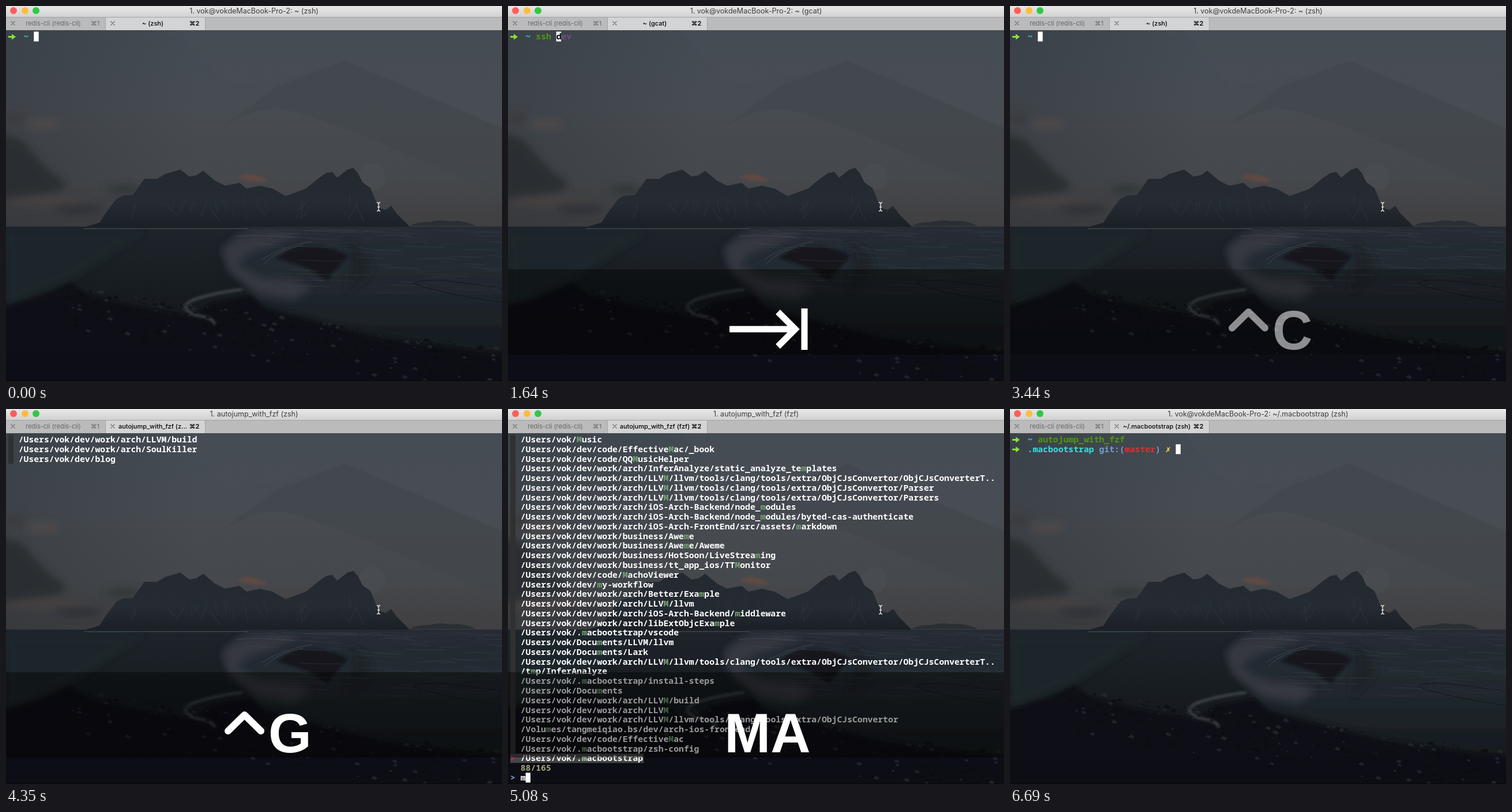
An HTML page that plays this animation: 860 by 651 pixels, repeating every 8 s.

```html
<!DOCTYPE html>
<html lang="en">
<head>
<meta charset="utf-8">
<title>Terminal</title>
<style>
  html, body { margin: 0; width: 100%; height: 100%; overflow: hidden; background: #0d0f11; }
  svg { display: block; width: 860px; height: 651px; }
  .ui { font-family: Inter, "Liberation Sans", "DejaVu Sans", sans-serif; text-anchor: middle; }
  .tab { font-size: 11px; }
  .mono { font: 600 14.76px "Noto Sans Mono", "DejaVu Sans Mono", monospace; fill: #fff; white-space: pre; }
  .key { font: bold 96px "Liberation Sans", sans-serif; fill: #fff; }
</style>
</head>
<body>
<svg viewBox="0 0 860 651" xmlns="http://www.w3.org/2000/svg">
  <defs>
    <linearGradient id="sky" x2="0" y2="1">
      <stop stop-color="#434b53"/><stop offset=".4" stop-color="#474c52"/>
      <stop offset=".75" stop-color="#45484c"/><stop offset="1" stop-color="#403f41"/>
    </linearGradient>
    <linearGradient id="shade"><stop stop-color="#1f252c" stop-opacity=".25"/><stop offset="1" stop-color="#1f252c" stop-opacity="0"/></linearGradient>
    <linearGradient id="rock" x2="0" y2="1"><stop stop-color="#23292f"/><stop offset=".6" stop-color="#252b32"/><stop offset="1" stop-color="#1b2026"/></linearGradient>
    <linearGradient id="sand" x2="0" y2="1">
      <stop stop-color="#1e242a"/><stop offset=".4" stop-color="#171c21"/><stop offset="1" stop-color="#0e1012"/>
    </linearGradient>
    <linearGradient id="sea" x2="0" y2="1">
      <stop stop-color="#262d35"/><stop offset=".5" stop-color="#20272d"/><stop offset="1" stop-color="#14181c"/>
    </linearGradient>
    <linearGradient id="bar" x2="0" y2="1"><stop stop-color="#e8e8e8"/><stop offset="1" stop-color="#d0d0d0"/></linearGradient>
    <filter id="soft" x="-50%" y="-50%" width="200%" height="200%"><feGaussianBlur stdDeviation="7"/></filter>
    <filter id="haze" x="-50%" y="-50%" width="200%" height="200%"><feGaussianBlur stdDeviation="2"/></filter>
    <clipPath id="band"><rect y="457" width="860" height="148"/></clipPath>
    <clipPath id="ground"><rect y="383" width="860" height="268"/></clipPath>
  </defs>

  <g id="photo">
    <rect y="42" width="860" height="342" fill="url(#sky)"/>
    <path d="M380 140Q500 128 588 95L860 212V42H300Z" fill="#4b5059" opacity=".35" filter="url(#haze)"/>
    <path d="M360 220Q410 185 460 178T860 330V212L588 95 470 140Z" fill="#42474c" opacity=".6"/>
    <rect y="42" width="330" height="342" fill="url(#shade)"/>
    <g filter="url(#soft)">
      <path d="M-20 222Q30 225 42 250Q60 270 80 290Q120 312 90 322Q40 330 -20 338Z" fill="#292d32"/>
      <ellipse cx="65" cy="205" rx="30" ry="8" fill="#4f4948"/>
      <ellipse cx="15" cy="195" rx="18" ry="12" fill="#3a3b3e"/>
      <ellipse cx="70" cy="338" rx="70" ry="5" fill="#4b423f"/>
      <ellipse cx="125" cy="353" rx="42" ry="9" fill="#2f3337"/>
      <ellipse cx="203" cy="319" rx="30" ry="9" fill="#33373b"/>
    </g>
    <path d="M401 297Q425 284 455 304Q425 308 401 297Z" fill="#614a42" filter="url(#haze)"/>
    <circle cx="635" cy="297" r="23" fill="#555a60" opacity=".22"/>
    <path d="M700 382Q712 374 735 375Q750 370 770 374Q790 370 815 382Z" fill="#292f35"/>
    <path d="M138 383L162 376 178 352 192 334 204 329 220 328 240 300 262 300 275 292 302 284 318 296 330 294 342 286 362 303 380 312 405 307 417 317 440 312 462 317 485 330 520 317 542 299 555 290 566 288 574 298 592 284 602 281 610 290 618 306 632 316 646 350 658 354 668 347 677 360 700 383Z" fill="url(#rock)"/>
    <g id="ridges" fill="none" stroke="#353b42" opacity=".5"/>
    <g clip-path="url(#ground)">
      <rect y="382" width="860" height="269" fill="url(#sand)"/>
      <path d="M420 380H880V610Q700 585 600 560T440 515Q390 460 375 425Z" fill="url(#sea)" filter="url(#soft)"/>
      <g filter="url(#soft)">
        <path d="M400 402Q450 392 510 396L470 412 420 430 400 450 440 470 500 475 530 490 500 510 440 500 385 460 375 420Z" fill="#34393f"/>
        <path d="M590 410Q640 430 630 465L590 500 600 450Z" fill="#1c2228"/>
        <path d="M0 392L240 392 120 470 0 520Z" fill="#1f252a"/>
      </g>
      <path d="M497 419Q560 412 592 434L575 455 565 465 558 476 545 470 528 457 500 447 470 438Z" fill="#14191d" filter="url(#haze)"/>
      <path d="M135 386.500H420" stroke="#565b5f" opacity=".8"/>
      <g id="waves" fill="none" stroke="#414950" opacity=".45"/>
      <path d="M448 448Q464 426 515 415M444 440Q475 418 530 409M400 400Q440 396 500 402" fill="none" stroke="#484e54" opacity=".8"/>
      <path d="M860 515Q760 500 706 482Q720 468 860 490" fill="none" stroke="#11161a"/>
      <path d="M-20 525Q60 510 110 480L140 500 220 520 325 540 355 515 425 503 450 526 560 555 650 580 880 605V680H-20Z" fill="#0d1012" opacity=".85" filter="url(#haze)"/>
      <path d="M330 537Q295 524 325 510Q360 498 410 492M330 537Q360 541 362 553" fill="none" stroke="#454b50" stroke-width="4" filter="url(#haze)"/>
      <g id="stones"/>
    </g>
    <rect y="650" width="860" height="1" fill="#060708"/>
  </g>

  <g id="chrome">
    <rect width="860" height="20" fill="url(#bar)"/>
    <rect y="20" width="860" height="22" fill="#bbb"/>
    <rect x="173" y="20" width="172" height="22" fill="#d4d4d4"/>
    <path d="M0 19.500H860M172.500 20V42M345.500 20V42" stroke="#a3a3a3"/>
    <circle cx="13" cy="8" r="6" fill="#fc5f5a"/><circle cx="33" cy="8" r="6" fill="#fdbc40"/><circle cx="52" cy="8" r="6" fill="#30c748"/>
    <path d="M8.500 26.500l7 7m0-7l-7 7M181.500 26.500l7 7m0-7l-7 7" stroke="#6c6c6c" stroke-width="1.1"/>
    <g class="ui tab">
      <text x="82" y="34" fill="#666">redis-cli (redis-cli)</text>
      <text x="154.500" y="34" fill="#666">⌘1</text>
      <text id="tab" x="254.500" y="34" font-weight="500"/>
      <text x="326.500" y="34" font-weight="600">⌘2</text>
    </g>
    <text id="title" class="ui" x="430" y="13" font-size="12.500" fill="#3c3c3c"/>
  </g>

  <g id="term" class="mono"/>
  <path d="M643 341Q646 341 646 344V353Q646 356 643 356M649 341Q646 341 646 344M646 353Q646 356 649 356M644 349H648" fill="none" stroke="#e4e4e4" stroke-width="1.3"/>
  <g id="keys" clip-path="url(#band)">
    <rect y="457" width="860" height="148" opacity=".4"/>
    <g id="glyph" class="key"/>
  </g>
</svg>

<script>
const $ = id => document.getElementById(id);
const LOOP = 8000, COL = 8.857, ROW = 16.77, LEFT = 4;
const GREEN = '#4e9a06', LIME = '#8ae234', CYAN = '#34e2e2', RED = '#ef2929', HINT = '#75507b';

// Scenery details
let seed = 7;
const rnd = (a, b) => {
  seed = (seed * 16807) % 2147483647;
  return a + (b - a) * seed / 2147483647;
};
const many = (n, make) => Array.from({ length: n }, make).join('');

$('ridges').innerHTML = many(40, () => {
  const x = rnd(225, 640), y = rnd(322, 350), dx = rnd(-18, 18);
  return `<path d="M${x} ${y}l${dx * .4} 12l${dx * .6} ${rnd(6, 18)}" stroke-width="${rnd(.4, 1.6)}"/>`;
});
$('waves').innerHTML = many(110, () => {
  const d = rnd(0, 1) ** 1.6, x = rnd(400 + d * 90, 850), w = rnd(15, 80);
  return `<path d="M${x} ${388 + d * 110}q${w / 2} ${rnd(-3, 3)} ${w} ${rnd(0, 3)}" stroke-width="${rnd(.4, 1.2)}"/>`;
});
$('stones').innerHTML = many(240, (_, i) => {
  const x = rnd(100, 860), y = 475 + x * .14 + rnd(0, 1) ** 1.5 * 80, w = rnd(3, 12);
  return `<path d="M${x} ${y}l${w * .4} ${-w * .4}l${w * .6} ${w * .3}l${-w * .2} ${w * .4}z" fill="${i % 3 ? '#0b0d10' : '#262c31'}" opacity=".7"/>`;
});

// Terminal drawing
const rowY = r => 58 + r * ROW;
const at = (col, row, s, fill = '#fff') =>
  `<text x="${LEFT + col * COL}" y="${rowY(row)}" fill="${fill}">${s}</text>`;
const block = (col, row) =>
  `<rect x="${LEFT + col * COL}" y="${rowY(row) - 13.5}" width="8.4" height="17" fill="#fff"/>`;
const arrow = row =>
  `<path transform="translate(4 ${row * ROW})" d="M0 52H6V48.500L13 53.500 6 58.500V55H0Z" fill="${LIME}"/>`;
const home = arrow(0) + at(3, 0, '~', CYAN);

function typed(n) {
  const line = 'ssh dev';
  return home + at(5, 0, line.slice(0, n), n < 3 ? RED : GREEN) + block(5 + n, 0)
    + at(5 + n, 0, line[n], '#000') + at(6 + n, 0, line.slice(n + 1), HINT);
}

// In the lists: @ home, % work folder, & clang tools folder, * marks the next character as matched
const expand = s => s.replace('@', '/Users/vok').replace('%', '/dev/work')
  .replace('&', '/tools/clang/tools/extra').replace('^', '/tools/cl*ang/tools/extra')
  .replace('#', '/ObjCJsConvertor').replace('+', '/ObjCJsConverterT..');
const entry = (s, row, color) =>
  at(2, row, expand(s).replace(/\*(.)/g, `<tspan fill="${color}">$1</tspan>`));
const gutter = rows =>
  `<rect x="4" y="44.500" width="9" height="${rows * ROW}" fill="#303030"/>`;

function finder(items, count, query) {
  const last = items.length - 1;
  return gutter(last)
    + `<rect x="4" y="${rowY(last) - 13}" width="${26 * COL + 1}" height="16" fill="#454647"/>`
    + items.map((s, i) => entry(s, i, i === last ? '#a5d0a0' : '#74a274')).join('')
    + at(0, last, '&gt;', '#e0215c') + at(2, 34, count + '/165', '#a3a37c')
    + at(0, 35, '&gt;', '#87afd7') + at(2, 35, query) + block(2 + query.length, 35);
}

const listM = `@/*Music
@/dev/code/Effective*Mac/_book
@/dev/code/QQ*MusicHelper
@%/arch/InferAnalyze/static_analyze_te*mplates
@%/arch/LLV*M/llvm&#+
@%/arch/LLV*M/llvm&#/Parser
@%/arch/LLV*M/llvm&#/Parsers
@%/arch/iOS-Arch-Backend/node_*modules
@%/arch/iOS-Arch-Backend/node_*modules/byted-cas-authenticate
@%/arch/iOS-Arch-FrontEnd/src/assets/*markdown
@%/business/Awe*me
@%/business/Awe*me/Aweme
@%/business/HotSoon/LiveStrea*ming
@%/business/tt_app_ios/TT*Monitor
@/dev/code/*MachoViewer
@/dev/*my-workflow
@%/arch/Better/Exa*mple
@%/arch/LLV*M/llvm
@%/arch/iOS-Arch-Backend/*middleware
@%/arch/libExtObjcExa*mple
@/.*macbootstrap/vscode
@/Docu*ments/LLVM/llvm
@/Docu*ments/Lark
@%/arch/LLV*M/llvm&#+
/t*mp/InferAnalyze
@/.*macbootstrap/install-steps
@/Docu*ments
@%/arch/LLV*M/build
@%/arch/LLV*M
@%/arch/LLV*M/llvm&#
/Volu*mes/tangmeiqiao.bs/dev/arch-ios-frontend
@/dev/code/Effective*Mac
@/.*macbootstrap/zsh-config
@/.*macbootstrap`.split('\n');

const listMa = `@/.*m*acbootstrap/tools
@/Desktop/*m*acbootstrap
@/Documents/LLVM/llv*m/tools/cl*ang
@/Documents/LLVM/llv*m/tools/cl*ang/tools
@/Documents/LLVM/llv*m^
@%/arch/InferAnalyze/static_analyze_te*mpl*ates/Example
@%/arch/LLVM/llv*m^
@%/arch/LLVM/llv*m^#+
@%/arch/SoulKiller/app/bower_co*mponents/bootstr*ap
/Volu*mes/Seeg*ate
/Volu*mes/XI*AOMI
@/.cocoapods/repos/*m*aster
@/.*m*acbootstrap/config/ranger
@/.*m*acbootstrap/software/qiniu
@/dev/code/Effective*M*ac/_book
@%/arch/InferAnalyze/static_analyze_te*mpl*ates
@%/arch/LLVM/llv*m^#+
@%/arch/LLVM/llv*m^#/Parser
@%/arch/LLVM/llv*m^#/Parsers
@%/arch/iOS-Arch-Backend/node_*modules/byted-cas-*authenticate
@%/arch/iOS-Arch-FrontEnd/src/assets/*m*arkdown
@%/business/Awe*me/*Aweme
@/dev/code/*M*achoViewer
@%/arch/iOS-Arch-Backend/*middlew*are
@/.*m*acbootstrap/vscode
@/Docu*ments/L*ark
@%/arch/LLVM/llv*m^#+
/t*mp/Infer*Analyze
@/.*m*acbootstrap/install-steps
@%/arch/LLVM/llv*m^#
/Volu*mes/t*angmeiqiao.bs/dev/arch-ios-frontend
@/dev/code/Effective*M*ac
@/.*m*acbootstrap/zsh-config
@/.*m*acbootstrap`.split('\n');

const firstRows = ['@%/arch/LLVM/build', '@%/arch/SoulKiller', '@/dev/blog'];
const listAll = firstRows.concat(listM.slice(3).map(s => s.replace(/\*/g, '')));

const jumped = home + at(5, 0, 'autojump_with_fzf', GREEN) + arrow(1)
  + at(3, 1, '.macbootstrap', CYAN) + at(17, 1, 'git:(', '#729fcf') + at(22, 1, 'master', RED)
  + at(28, 1, ')', '#729fcf') + at(30, 1, '✗', '#fce94f') + block(32, 1);

// Key overlay
const word = s => `<text x="450" y="596" text-anchor="middle">${s}</text>`;
const ctrl = s => `<path d="M385 559L413.500 531 442 559" fill="none" stroke="#fff" stroke-width="12" stroke-linecap="round" stroke-linejoin="round"/><text x="455" y="596">${s}</text>`;
const tabKey = '<path d="M384 561H494M468 531L498 561 468 591M514 525V597" fill="none" stroke="#fff" stroke-width="11"/>';
const enterKey = '<path d="M458 523H466C492 523 492 560 466 560H428" fill="none" stroke="#fff" stroke-width="10"/><path d="M408 560L430 537V583Z"/>';

const host = '1. vok@vokdeMacBook-Pro-2: ';
const tracks = {
  term: [
    [0, home + block(5, 0)], [500, typed(1)], [610, typed(2)], [760, typed(3)], [960, typed(4)],
    [2760, home + block(5, 0)], [4080, home + at(5, 0, 'autojump_with_fzf', GREEN)],
    [4350, gutter(3) + firstRows.map((s, i) => entry(s, i)).join('')],
    [4470, finder(listAll, 165, '')], [4840, finder(listM, 88, 'm')],
    [5170, finder(listMa, 46, 'ma')], [5930, jumped]
  ],
  glyph: [
    [0, ''], [500, word('S')], [760, word('H')], [960, word('Space')], [1110, tabKey],
    [2330, ctrl('C')], [4080, ctrl('G')], [4770, word('M')], [4980, word('MA')], [5550, enterKey]
  ],
  title: [
    [0, host + '~ (zsh)'], [1640, host + '~ (gcat)'], [3080, host + '~ (zsh)'],
    [4200, '1. autojump_with_fzf (zsh)'], [4560, '1. autojump_with_fzf (fzf)'],
    [5840, host + '~/.macbootstrap (fzf)'], [6690, host + '~/.macbootstrap (zsh)']
  ],
  tab: [
    [0, '~ (zsh)'], [1640, '~ (gcat)'], [3080, '~ (zsh)'], [4200, 'autojump_with_fzf (z...'],
    [4560, 'autojump_with_fzf (fzf)'], [5840, '~/.macbootstrap (fzf)'], [6690, '~/.macbootstrap (zsh)']
  ]
};
// Overlay visibility: shown from, fade start, fade end
const shows = [[500, 1990, 2250], [2330, 3320, 3580], [4080, 5680, 6430]];

const shown = {};
function draw(t) {
  for (const id in tracks) {
    const now = tracks[id].filter(([start]) => start <= t).pop()[1];
    if (shown[id] !== now) $(id).innerHTML = shown[id] = now;
  }
  const show = shows.find(([from, , end]) => t >= from && t < end);
  $('keys').setAttribute('opacity', show ? Math.min(1, (show[2] - t) / (show[2] - show[1])) : 0);
}

const start = performance.now();
function tick() {
  draw((performance.now() - start) % LOOP);
  requestAnimationFrame(tick);
}
tick();
</script>
</body>
</html>
```
